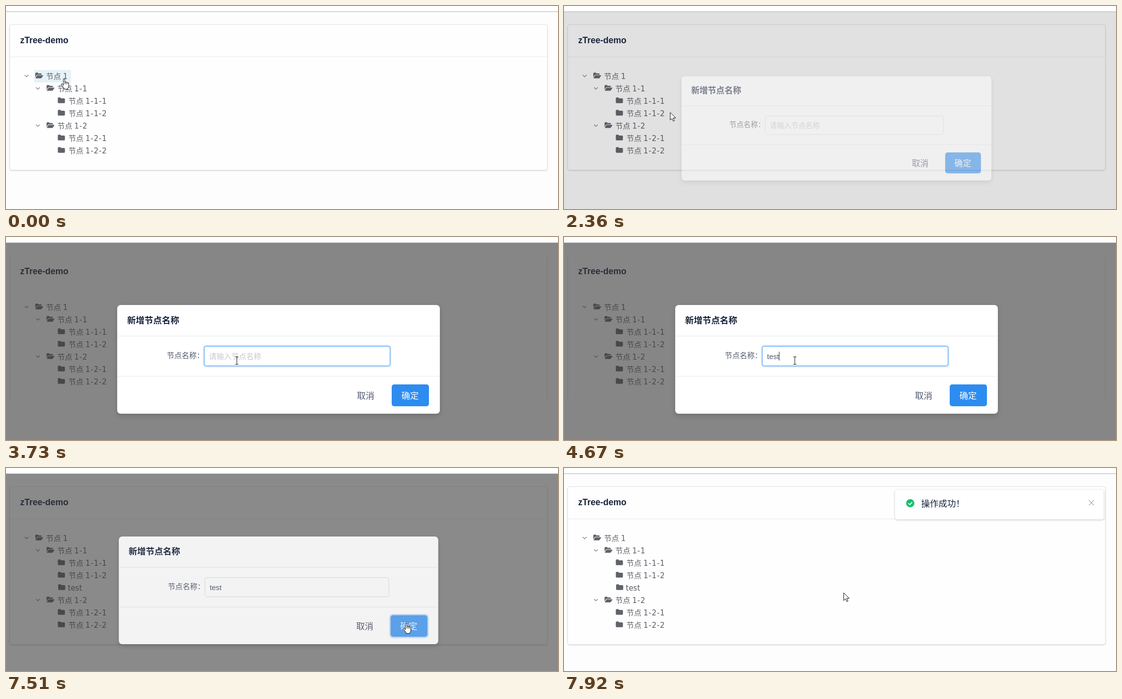
Animation, 1112 px wide and 409 px high, one loop 8 s. Source, as an HTML page:

```html
<!DOCTYPE html>
<html lang="zh-CN">
<head>
<meta charset="utf-8">
<title>zTree-demo</title>
<style>
  html, body { margin: 0; width: 100%; height: 100%; overflow: hidden; background: #fff; }
  svg { display: block; width: 1112px; height: 409px; }
  text { font-family: "Noto Sans CJK SC", "Noto Sans CJK", sans-serif; white-space: pre; }
  .node { font-size: 15px; font-weight: 300; fill: #5c5f66; }
  .num { font: 400 15px "DejaVu Sans", sans-serif; letter-spacing: .8px; }
  .word { font: 400 15px "DejaVu Sans", sans-serif; }
  .arial { font-family: "Liberation Sans", Arial, sans-serif; }
  .head { font-size: 17.5px; font-weight: 700; fill: #17233d; }
  .item { font-size: 12.6px; fill: #515a6e; }
  .big { font-size: 17.5px; fill: #515a6e; }
  .field { font-size: 15px; fill: #515a6e; }
  .rule { stroke: #e8eaec; }
  .icon { fill: #5f6369; }
  .dark { fill: #454f63; }
  .line { fill: none; stroke: #777c85; stroke-width: 1.2; }
  .mark { fill: none; stroke: #fff; stroke-width: 1.8; }
  #card { filter: drop-shadow(0 1px 1px rgba(0,0,0,.16)); }
  #panel { filter: drop-shadow(0 4px 5px rgba(0,0,0,.16)); }
  #toast rect { filter: drop-shadow(0 1px 2px rgba(0,0,0,.22)); }
  #menu > rect:first-child { filter: drop-shadow(0 1px 1px rgba(0,0,0,.1)); }
</style>
</head>
<body>
<svg viewBox="0 0 1112 409">
  <defs>
    <g id="open">
      <path d="M0 9.5V2Q0 .3 1.6 .3H4.6Q6 .3 6 1.8H11.2Q12.8 1.8 12.8 3.4V4.6H5Q3.6 4.6 2.6 5.8Z"/>
      <path d="M4.9 5.6H15.4Q16.3 5.7 15.7 6.6L13 10.5Q12.2 11.7 11 11.7H1.1Q.1 11.6 .7 10.7L3.2 6.8Q3.9 5.6 4.9 5.6Z"/>
    </g>
    <path id="closed" d="M0 2Q0 .3 1.7 .3H4.7Q6.2 .3 6.2 2H12.6Q14.3 2 14.3 3.7V10Q14.3 11.7 12.6 11.7H1.7Q0 11.7 0 10Z"/>
    <path id="chevron" class="line" d="M-3.7 -2L0 1.7L3.7 -2"/>
  </defs>

  <rect width="1112" height="409" fill="#fdfdfd"/>
  <rect width="1112" height="11" fill="#fff"/>
  <path d="M0 11.5H1112" stroke="#b2b2b2"/>

  <rect id="card" x="7.5" y="37.5" width="1083" height="293" rx="4" fill="#fefefe" stroke="#e2e3e5"/>
  <path id="sides" d="M7.5 40V326M1090.5 40V326" stroke="#dcdcdc"/>
  <path id="rule" class="rule" d="M8 102.5H1090"/>
  <text class="head arial" x="28.5" y="75">zTree-demo</text>
  <rect id="hover0" x="57" y="129" width="74" height="25" fill="#e5f2f8"/>
  <rect id="hover1" x="80" y="154" width="89" height="25" fill="#e5f2f8"/>
  <g id="tree"></g>
  <g id="lower"></g>
  <g id="added">
    <use href="#closed" class="icon" x="105" y="234"/>
    <text class="node word" x="124.5" y="246.5">test</text>
  </g>

  <g id="menu">
    <rect x="126.5" y="174.5" width="224" height="207" rx="4" fill="#fff" stroke="#dfdfdf"/>
    <rect id="pick0" x="127" y="202" width="223" height="25" fill="#f7f7f7"/>
    <rect id="pick1" x="127" y="227" width="223" height="25" fill="#f7f7f7"/>
    <path class="rule" d="M127 201.5H350M127 277.5H350"/>
    <path fill="#17233d" d="M141 187L146.5 181.5H151V186L145.5 192ZM147 192.3L152.5 186.6V182L154 183.5V187L148.5 192.7Z"/>
    <text x="159" y="192.5" font-size="15" font-weight="700" fill="#17233d">菜单</text>
    <g class="line" stroke-width="1">
      <circle cx="148.5" cy="215" r="7"/><path d="M144.5 215H152.5M148.5 211V219"/>
      <path d="M150 235.5H142.5V245.5H153.5V239"/><path d="M147 242L154.5 234.5" stroke="#d99a68" stroke-width="2"/>
      <circle cx="148.5" cy="265" r="7"/><path d="M144.5 265H152.5"/>
    </g>
    <g class="dark">
      <circle cx="148.5" cy="292.5" r="7.3"/>
      <circle cx="148.5" cy="342.5" r="7.3"/>
      <ellipse cx="143" cy="366" rx="1.7" ry="2.2"/><ellipse cx="146.4" cy="362.4" rx="1.7" ry="2.4"/>
      <ellipse cx="150.6" cy="362.4" rx="1.7" ry="2.4"/><ellipse cx="154" cy="366" rx="1.7" ry="2.2"/>
      <path d="M148.5 366.3Q150.5 366.3 152 369.5Q154.5 374 151 374Q148.5 372.6 146 374Q142.5 374 145 369.5Q146.5 366.3 148.5 366.3Z"/>
      <path d="M140.7 314L143.5 310L146.3 314ZM150.7 321L153.5 325L156.3 321Z"/>
    </g>
    <path class="mark" d="M144.5 292.5H152.5M148.5 288.5V296.5M151.6 340.5A3.7 3.7 0 1 0 152 344M152.4 338.5V341.5H149.5"/>
    <path class="line" style="stroke:#454f63;stroke-width:2" d="M143.5 313V322Q143.5 324 146.5 324M153.5 322V313Q153.5 311.5 150 311.5"/>
  </g>

  <rect id="mask" y="12" width="1112" height="397" fill="#373737"/>

  <g id="modal">
    <rect id="panel" x="224" y="137" width="650" height="219" rx="7" fill="#fff"/>
    <path class="rule" d="M224 199.5H874M224 280.5H874"/>
    <text class="head" x="244" y="173.5">新增节点名称</text>
    <text class="field" x="324" y="244">节点名称：</text>
    <rect id="glow" x="398.5" y="219" width="376" height="42" rx="5" fill="none" stroke="#2d8cf0" stroke-opacity=".25" stroke-width="3"/>
    <rect id="input" x="399.5" y="220.5" width="374" height="39" rx="4" fill="none"/>
    <text id="hint" class="field" x="409" y="246" style="fill:#c5c8ce">请输入节点名称</text>
    <text id="typed" class="field arial" x="409" y="246"></text>
    <rect id="caret" y="231" width="1" height="18" fill="#333"/>
    <text class="big" x="707" y="326">取消</text>
    <rect id="ring" x="775.7" y="295.7" width="77.6" height="46.6" rx="6" fill="none" stroke="#2d8cf0" stroke-opacity=".25" stroke-width="2.6"/>
    <rect id="ok" x="777" y="297" width="75" height="44" rx="5"/>
    <text class="big" x="796.5" y="326" style="fill:#fff">确定</text>
  </g>

  <g id="toast">
    <rect x="667" y="44" width="420" height="59.5" rx="4" fill="#fff"/>
    <circle cx="697.5" cy="71" r="8.3" fill="#19be6b"/>
    <path class="mark" stroke-width="1.4" d="M693.6 71.2L696.6 74L701.6 68.6"/>
    <text class="big" x="719.5" y="78" style="fill:#17233d">操作成功！</text>
    <path class="line" style="stroke:#a5a5a5" d="M1057.3 64.8L1067.7 75.2M1067.7 64.8L1057.3 75.2"/>
  </g>

  <g id="cursor" fill="#fff" stroke="#111" stroke-linejoin="round">
    <path id="arrow" d="M0 .5V16L3.7 12.6L6.1 18.2L8.5 17.2L6.1 11.6H11Z"/>
    <g id="hand" transform="translate(-5.5)">
      <path d="M5 14V2Q5 .5 6.5 .5T8 2V8Q8 6.8 9.4 6.8T10.8 8.2Q11 7.4 12.2 7.4T13.5 9Q13.8 8.3 14.8 8.5T16 10V15Q16 18 14 19.5V21.5H6.5V19.5L1 13Q.2 11.5 1.3 10.8T3.6 11.5Z"/>
      <path fill="none" stroke-width=".9" d="M8 8V11.5M10.8 8.2V11.5M13.5 9V11.5"/>
    </g>
    <path id="beam" fill="none" d="M-3 -7.5H3M0 -7.5V7.5M-3 7.5H3"/>
  </g>
</svg>
<script>
const LOOP = 8000;
const $ = id => document.getElementById(id);
const show = (id, on) => { $(id).style.visibility = on ? 'visible' : 'hidden'; };
const between = (t, a, b) => t >= a && t < b;

function row(depth, y, num, parent) {
  const x = 59 + depth * 22.7;
  const chevron = parent ? `<use href="#chevron" x="${x - 17.5}" y="${y}"/>` : '';
  const tx = x + 21.7;
  return `${chevron}<use href="#${parent ? 'open' : 'closed'}" class="icon" x="${x}" y="${y - 7}"/>
    <text class="node" x="${tx}" y="${y + 5.5}">节点<tspan class="num" x="${tx + 34}">${num}</tspan></text>`;
}
$('tree').innerHTML = row(0, 141, '1', true) + row(1, 166, '1-1', true) + row(2, 191, '1-1-1') + row(2, 216, '1-1-2');
$('lower').innerHTML = row(1, 241, '1-2', true) + row(2, 266, '1-2-1') + row(2, 291, '1-2-2');

const items = [[218, '新建节点'], [243, '重命名节点'], [268, '删除节点'], [297, '添加资产到节点'],
  [322, '移动资产到节点'], [347, '更新节点资产硬件信息'], [372, '测试节点资产可连接性']];
$('menu').insertAdjacentHTML('beforeend',
  items.map(([y, s]) => `<text class="item" x="166" y="${y}">${s}</text>`).join(''));

// pointer moves: first step, last step, number of steps, destination
const moves = [
  [150, 620, 4, 126, 174],
  [1040, 1500, 4, 196, 240],
  [1640, 1860, 3, 214, 214],
  [2750, 3270, 4, 465, 249],
  [6440, 7100, 6, 805, 312],
  [7660, 7660, 1, 740, 296],
  [7920, 7920, 1, 563.5, 251]
];
function pointer(t) {
  let x = 116, y = 146;
  for (const [start, end, n, tx, ty] of moves) {
    if (t < start) break;
    const k = n > 1 ? Math.min(n, Math.floor((t - start) / (end - start) * (n - 1) + 1e-6) + 1) : 1;
    const p = k / n, e = p * p * (3 - 2 * p);
    x += (tx - x) * e;
    y += (ty - y) * e;
  }
  return [x, y];
}

// time, mask opacity, dialog opacity, dialog scale
const fades = [
  [0, 0, 0, 1],
  [2360, .14, .5, .96],
  [2510, .44, 1, 1],
  [2750, .6, 1, 1],
  [7510, .575, .9, .99],
  [7660, .28, .45, .95],
  [7920, 0, 0, 1]
];
const keys = [4280, 4410, 4540, 4670];

function render(t) {
  const [, mask, alpha, scale] = fades.filter(f => f[0] <= t).pop();
  const [x, y] = pointer(t);
  const deep = mask === .6, added = t >= 7510;

  $('card').setAttribute('height', added ? 318 : 293);
  $('lower').setAttribute('transform', `translate(0 ${added ? 25 : 0})`);
  $('card').style.strokeOpacity = deep ? 0 : 1;
  $('card').style.filter = deep ? 'none' : '';
  show('sides', deep);
  show('rule', !deep);
  show('added', added);
  show('hover0', t < 900 && y < 154);
  show('hover1', t < 900 && y >= 154);

  const menu = between(t, 900, 2360);
  $('menu').style.display = menu ? '' : 'none';
  show('pick0', menu && y >= 202);
  show('pick1', menu && (y >= 227 || t >= 1500));

  $('mask').style.opacity = mask;
  $('modal').style.display = alpha ? '' : 'none';
  $('modal').style.opacity = alpha;
  $('modal').setAttribute('transform', `translate(549 246.5) scale(${scale}) translate(-549 -246.5)`);

  const focus = between(t, 3420, 7360);
  show('glow', focus);
  $('input').setAttribute('stroke', focus ? '#57a3f3' : '#dcdee2');
  const word = 'test'.slice(0, keys.filter(k => k <= t).length);
  $('typed').textContent = word;
  show('hint', !word);
  show('caret', between(t, 3420, 3730) || between(t, 4280, 6190) || between(t, 6720, 7360));
  $('caret').setAttribute('x', 409 + (word && alpha ? Math.round($('typed').getComputedTextLength()) : 0));

  const onOk = alpha && x > 777 && x < 852 && y > 297 && y < 341;
  $('ok').setAttribute('fill', onOk ? '#57a3f3' : '#2d8cf0');
  show('ring', t >= 7360);

  const landed = t >= 7920;
  $('toast').style.display = t >= 7660 ? '' : 'none';
  $('toast').style.opacity = landed ? 1 : .7;
  $('toast').setAttribute('transform', `translate(${landed ? 0 : 120} 0)`);

  const beam = t >= 2750 && alpha && x > 399 && x < 774 && y > 220 && y < 260;
  const hand = t < 900 || between(t, 1980, 2360) || onOk;
  show('hand', hand);
  show('beam', beam);
  show('arrow', !hand && !beam);
  $('cursor').setAttribute('transform', `translate(${x} ${y})`);
}

const begin = performance.now();
function tick() {
  render((performance.now() - begin) % LOOP);
  requestAnimationFrame(tick);
}
tick();
</script>
</body>
</html>
```
